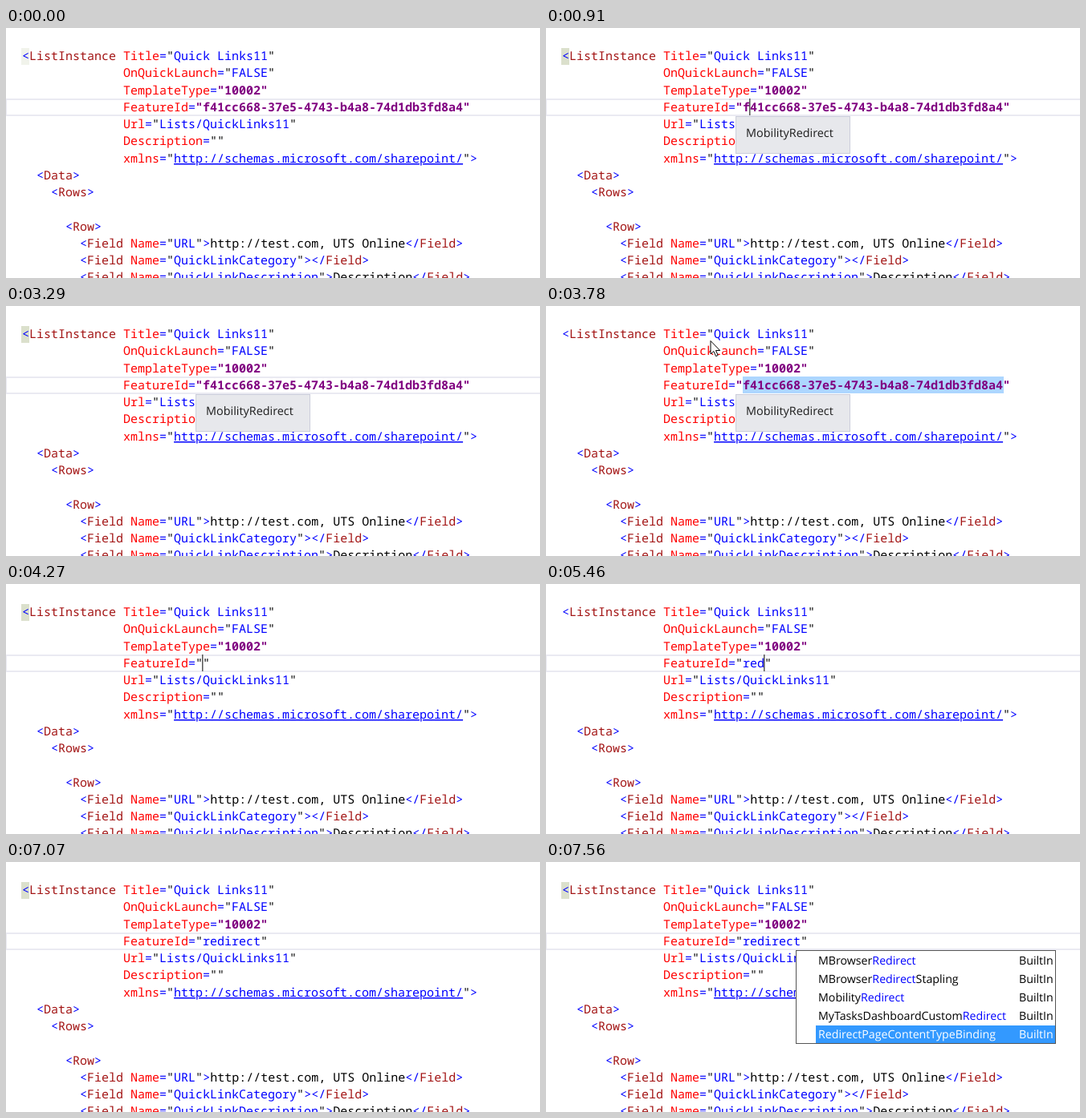
Recreate the animation shown at these times as an HTML page. Size 665 px wide and 312 px high, loop 8000 ms.

```html
<!DOCTYPE html>
<html lang="en">
<head>
<meta charset="utf-8">
<title>Editing a feature id</title>
<style>
  html, body { margin: 0; width: 100%; height: 100%; overflow: hidden; background: #fff; }
  svg { display: block; width: 665px; height: 312px; }
  text { white-space: pre; text-rendering: geometricPrecision; }
  #code { font: 15px "Noto Sans Mono", "DejaVu Sans Mono", monospace; }
  #tip, #list { font: 14.2px "Open Sans", "Noto Sans", sans-serif; }
  #tip { font-size: 14.4px; }
  .mark, .value, .link { fill: #00f; }
  .link { text-decoration: underline 1px; text-underline-offset: 2px; text-decoration-skip-ink: none; }
  .tag { fill: #a31515; }
  .attr { fill: #f00; }
  .id { fill: #800080; font-weight: bold; }
</style>
</head>
<body>
<svg viewBox="0 0 665 312">
  <rect id="line" x="0" y="89" width="680" height="20" fill="none" stroke="#eaeaf2" stroke-width="2"/>
  <rect id="brace" x="19" y="25" width="10" height="21" fill="#dbe0cc"/>
  <rect id="selection" x="245" y="88" width="325" height="21" fill="#add6ff"/>
  <g id="code"></g>
  <rect id="caret" y="88" width="1.5" height="21" fill="#555"/>
  <g id="tip">
    <rect x="236.5" y="110.5" width="142" height="46" fill="#e7e8ec" stroke="#cccedb"/>
    <text x="249" y="136" fill="#1e1e1e">MobilityRedirect</text>
  </g>
  <g id="list">
    <rect x="311.5" y="110.5" width="323" height="116" fill="#fff" stroke="#555"/>
    <rect x="336" y="204" width="298" height="22" fill="#39f"/>
  </g>
  <path id="pointer" d="M0 0V16.5L3.8 13L6.6 19.2L9.2 18L6.5 12H11.7Z" fill="#fff" stroke="#000"/>
</svg>
<script>
const LOOP = 8000, LEFT = 20, CHAR = 9, ROW = 21.25, BASE = 40;
const FEATURE_ROW = 3, VALUE_COL = 25;
const GUID = 'f41cc668-37e5-4743-b4a8-74d1db3fd8a4';
const featureLine = value => `              FeatureId="${value}"`;
const lines = [
  '<ListInstance Title="Quick Links11"',
  '              OnQuickLaunch="FALSE"',
  '              TemplateType="10002"',
  featureLine(GUID),
  '              Url="Lists/QuickLinks11"',
  '              Description=""',
  '              xmlns="http://schemas.microsoft.com/sharepoint/">',
  '  <Data>',
  '    <Rows>',
  '',
  '      <Row>',
  '        <Field Name="URL">http://test.com, UTS Online</Field>',
  '        <Field Name="QuickLinkCategory"></Field>',
  '        <Field Name="QuickLinkDescription">Description</Field>'
];
const options = ['MBrowserRedirect', 'MBrowserRedirectStapling', 'MobilityRedirect',
  'MyTasksDashboardCustomRedirect', 'RedirectPageContentTypeBinding'];

const $ = id => document.getElementById(id);
const make = (parent, name, attrs, content = '') => {
  const node = document.createElementNS('http://www.w3.org/2000/svg', name);
  for (const key in attrs) node.setAttribute(key, attrs[key]);
  node.textContent = content;
  return parent.appendChild(node);
};
const span = (parent, kind, content) => make(parent, 'tspan', { class: kind }, content);

const TOKENS = /"([^"]*)"|(<\/?|[=>])|((?<=<\/?)\w+)|(\w+(?==))|(?<=>)[^<]+|\s+/g;
function paintLine(node, line) {
  node.textContent = '';
  for (const [token, value, mark, tag, attr] of line.trim().matchAll(TOKENS)) {
    if (value === undefined) {
      span(node, mark ? 'mark' : tag ? 'tag' : attr ? 'attr' : '', token);
    } else if (/^\d+$|-/.test(value)) {
      span(node, 'id', token);
    } else {
      span(node, '', '"');
      span(node, value.startsWith('http') ? 'link' : 'value', value);
      span(node, '', '"');
    }
  }
}

const rows = lines.map((line, i) => {
  const indent = Math.max(0, line.search(/\S/));
  const node = make($('code'), 'text', { x: LEFT + indent * CHAR, y: Math.round(BASE + i * ROW) });
  paintLine(node, line);
  return node;
});

options.forEach((option, i) => {
  const selected = i === 4, y = 128 + 23 * i, fill = selected ? '#fff' : '#000';
  const node = make($('list'), 'text', { x: 339, y, fill });
  for (const part of option.split(/(Redirect)/))
    span(node, part === 'Redirect' && !selected ? 'mark' : '', part);
  make($('list'), 'text', { x: 589, y, fill }, 'BuiltIn');
});

// Step tracks: [start in ms, state]
const values = [[0, GUID], [4060, ''],
  ...[4970, 5180, 5390, 5530, 5740, 5950, 6300, 6510].map((ms, i) => [ms, 'redirect'.slice(0, i + 1)])];
const braceTrack = [[0, .4], [70, .6], [140, 1], [2800, 0], [2870, .5], [2940, 1],
  [3430, 0], [4130, .5], [4270, 1], [4970, 0], [6510, .5], [6580, 1]];
const caretTrack = [[0, 0], [70, 1], [420, 0], [910, 1], [1400, 0], [1820, 1], [2310, 0],
  [2660, 1], [3290, 0], [4060, 1], [7070, 0], [7280, 1], [7560, 0]];
const tipTrack = [[0, 0], [140, .6], [210, 1], [2800, 0], [2940, 1], [4060, 0]];
const at = (track, t) => track.findLast(([ms]) => ms <= t)[1];
const show = (id, opacity) => $(id).setAttribute('opacity', +opacity);

let shown = GUID;
function draw(t) {
  const value = at(values, t);
  if (value !== shown) paintLine(rows[FEATURE_ROW], featureLine(shown = value));

  const selecting = t >= 3430 && t < 4060;
  const col = value === GUID ? VALUE_COL + (t < 2800) : VALUE_COL + value.length;
  $('caret').setAttribute('x', LEFT + col * CHAR - 1);
  show('caret', at(caretTrack, t));
  show('brace', at(braceTrack, t));
  show('tip', at(tipTrack, t));
  show('line', !selecting);
  show('selection', selecting);
  show('list', t >= 7280);

  const move = (Math.floor(t / 70) * 70 - 3780) / 140;
  show('pointer', t >= 3640 && t < 3990);
  $('pointer').setAttribute('transform', `translate(${205 - 8 * move} ${43.5 - 12 * move})`);
}

const start = performance.now();
function tick() {
  draw((performance.now() - start) % LOOP);
  requestAnimationFrame(tick);
}
tick();
</script>
</body>
</html>
```
